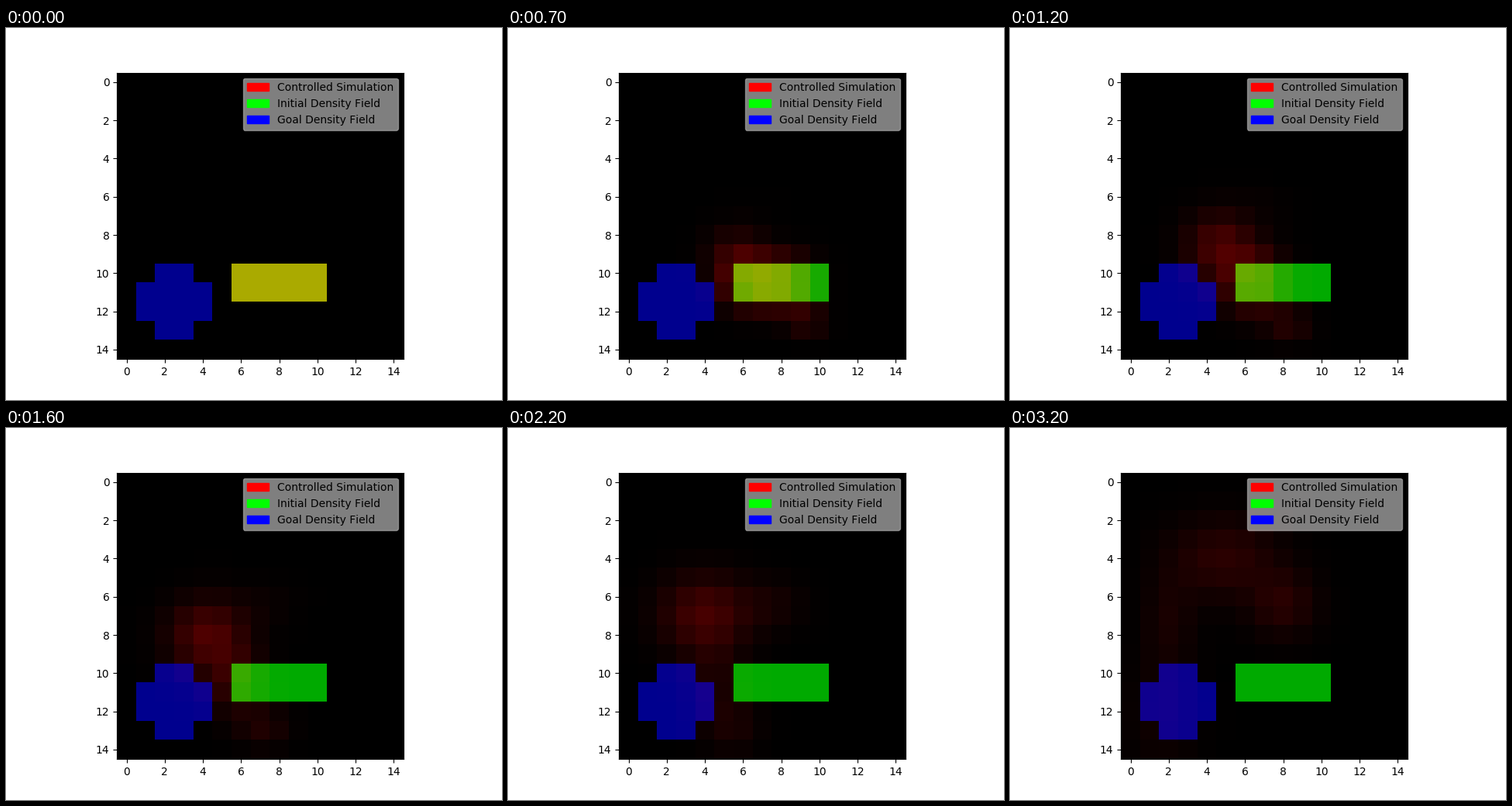
A matplotlib script that plays this animation: 640x480 px, repeating every 3.3 s.

```python
import numpy as np
import matplotlib.pyplot as plt
from matplotlib.animation import FuncAnimation
from matplotlib.patches import Patch

N = 15
FRAMES = 33
INTERVAL = 100
FULL = 170
GRID_Y, GRID_X = np.mgrid[0:N, 0:N]

plt.rcParams["text.kerning_factor"] = 6


def blob(density, x, y, w, h, px=2, py=2):
    """Soft spot of density; high powers give a hard-edged box."""
    dx = np.abs(GRID_X - x) / w
    dy = np.abs(GRID_Y - y) / h
    return density * np.exp(-dx**px - dy**py)


def pulse(s, peak):
    """Rise from 0 to 1 at the peak, then fade slowly."""
    return (s / peak * np.exp(1 - s / peak)) ** 2


def body(s):
    """The starting box: it softens, thins out and drifts left."""
    density = 22 + 148 * np.exp(-((s / 0.43) ** 3.3))
    width = 1.3 + 1.2 * np.exp(-((s / 0.33) ** 3))
    return blob(density, 8 - 6 * s**1.4, 10.5 - 3.3 * s**6, width, 1 + 1.4 * s,
                2 + 38 * np.exp(-18 * s), 2 + 38 * np.exp(-32 * s))


def plume(s):
    """The main cloud: it swings left, then climbs."""
    return blob(78 * pulse(s, 0.5), 4 + 8 * (s - 0.67) ** 2, 9.2 - 5.2 * s**2.2,
                1.1 + 1.7 * s, 0.3 + 1.8 * (1 - np.exp(-4 * s)))


def trail(s):
    """The wake that slides left below the box."""
    density = 50 * np.exp(-s) * min(1, 8 * s)
    return blob(density, 10.2 - 8.5 * s**1.5, 12 + 0.8 * np.sin(np.pi * s),
                0.8 + s, 0.8 + 2.2 * s**3)


def arm(s):
    """The late branch curling over to the right."""
    return blob(38 * s**2, 6.4 + 1.6 * s, 6.4, 1.7, 0.5 + 1.2 * s)


def simulation(step):
    s = step / (FRAMES - 1)
    field = body(s) + plume(s) + trail(s) + arm(s)
    return np.clip(field, 0, 255).round()


start = np.zeros((N, N), dtype=bool)
start[10:12, 6:11] = True
goal = np.zeros((N, N), dtype=bool)
goal[10:14, 2:4] = goal[11:13, 1:5] = True

image = np.zeros((N, N, 3), dtype=np.uint8)
image[start, 1] = FULL
image[goal, 2] = round(FULL * start.sum() / goal.sum())  # same total mass

fig, ax = plt.subplots(figsize=(6.4, 4.8), dpi=100)
picture = ax.imshow(image, interpolation="nearest")
labels = ["Controlled Simulation", "Initial Density Field", "Goal Density Field"]
ax.legend(
    handles=[Patch(color=c, label=t) for c, t in zip(np.eye(3), labels)],
    loc="upper right",
    framealpha=0.5,
)


def update(step):
    image[..., 0] = simulation(step)
    picture.set_data(image.copy())
    return [picture]


anim = FuncAnimation(fig, update, frames=FRAMES, interval=INTERVAL, repeat=True)
plt.show()
```
